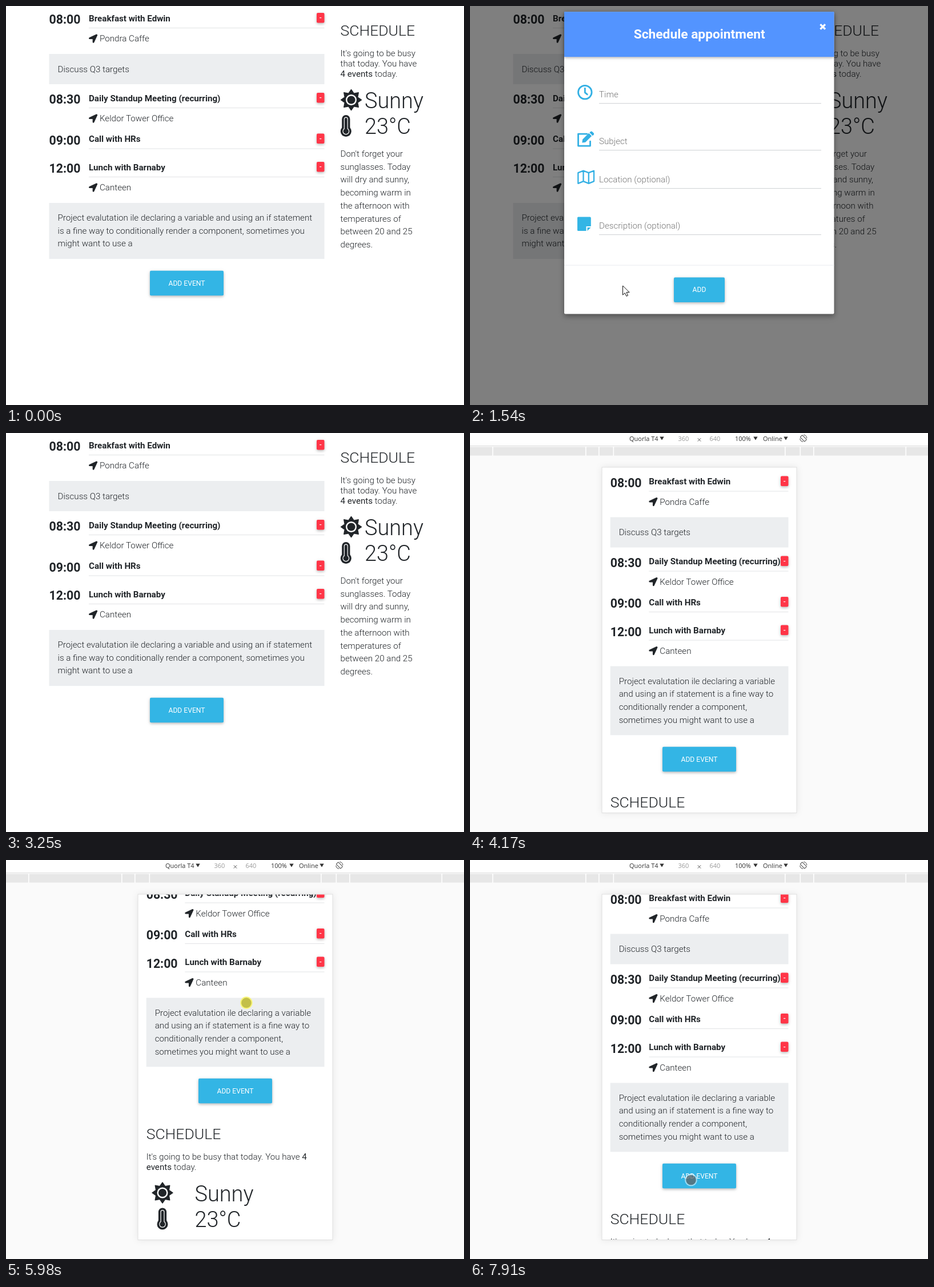
Animation of 802x699 px, one loop 8 s. Source, as an HTML page:

```html
<!DOCTYPE html>
<html lang="en">
<head>
<meta charset="utf-8">
<title>Day schedule</title>
<style>
  html, body { margin: 0; width: 100%; height: 100%; overflow: hidden; background: #fff; }
  svg { display: block; }
  text { font: 300 15.16px Roboto, sans-serif; fill: #212529; }
  .bar text { font: 400 11px "Open Sans", sans-serif; fill: #333; }
  .raised { filter: drop-shadow(0 2px 2px rgba(0,0,0,.2)) drop-shadow(0 1px 3px rgba(0,0,0,.1)); }
  .hover { filter: drop-shadow(0 4px 5px rgba(0,0,0,.25)) drop-shadow(0 3px 5px rgba(0,0,0,.14)); }
  .line { fill: none; stroke: #33b0e4; stroke-linejoin: round; stroke-linecap: round; }
</style>
</head>
<body>
<svg id="stage" width="802" height="699" viewBox="0 0 802 699"></svg>
<script>
const BLUE = '#33b5e5', DARK = '#212529';

const text = (x, y, str, { size = 15.16, weight = 300, fill = DARK, anchor = 'start' } = {}) =>
  `<text x="${x}" y="${y}" text-anchor="${anchor}" style="font-size:${size}px;font-weight:${weight};fill:${fill}">${str}</text>`;
const rect = (x, y, w, h, fill, extra = '') =>
  `<rect x="${x}" y="${y}" width="${w}" height="${h}" fill="${fill}" ${extra}/>`;
const circle = (x, y, r, fill, extra = '') =>
  `<circle cx="${x}" cy="${y}" r="${r}" fill="${fill}" ${extra}/>`;
const path = (d, fill = 'none', extra = '') => `<path d="${d}" fill="${fill}" ${extra}/>`;
const lines = (x, y, step, list) => list.map((s, i) => text(x, y + i * step, s)).join('');

const button = (x, y, w, label, id = '') =>
  rect(x, y, w, 43.5, BLUE, `rx="2" class="raised" ${id}`) +
  text(x + w / 2, y + 25.8, label, { size: 12.13, weight: 400, fill: '#fff', anchor: 'middle' });

const arrow = (x, y) => path(
  'M444 4L29 195c-48 23-32 93 19 93h176v176c0 51 70 67 93 19l192-416c16-38-26-80-65-63z',
  DARK, `transform="translate(${x} ${y}) scale(.0296)"`);

function sun(x, y) {
  const points = Array.from({ length: 16 }, (_, i) => {
    const a = i * Math.PI / 8, r = i % 2 ? 12.2 : 18;
    return `${x + r * Math.cos(a)},${y + r * Math.sin(a)}`;
  });
  return `<polygon points="${points.join(' ')}" fill="${DARK}" stroke="${DARK}" stroke-width="1.4" stroke-linejoin="round"/>` +
    circle(x, y, 9.5, '#fff') + circle(x, y, 7.1, DARK);
}

const thermometer = (x, y) => [[14.2, 9.5, DARK], [7.1, 5.9, '#fff'], [4.7, 4.75, DARK]]
  .map(([w, r, c]) => path(`M${x} ${y - 12}V${y + 9.5}`, 'none', `stroke="${c}" stroke-width="${w}" stroke-linecap="round"`) +
    circle(x, y + 9.5, r, c)).join('');

const events = [
  [0, '08:00', 'Breakfast with Edwin', 'Pondra Caffe'],
  [140, '08:30', 'Daily Standup Meeting (recurring)', 'Keldor Tower Office'],
  [211.5, '09:00', 'Call with HRs'],
  [261, '12:00', 'Lunch with Barnaby', 'Canteen']
];

function agenda(x, titleX, top, note) {
  const rows = events.map(([dy, time, title, place]) => {
    const y = top + dy;
    return text(x, y + 31.3, time, { size: 21.3, weight: 700 }) +
      text(titleX, y + 26.5, title, { weight: 700 }) +
      rect(titleX, y + 38, 557.5 - titleX, 1, '#e2e3e5') +
      rect(544, y + 12, 13.5, 17.5, '#ff3547', 'rx="2" class="raised"') +
      text(550.7, y + 25, '-', { size: 12, weight: 500, fill: '#fff', anchor: 'middle' }) +
      (place ? arrow(titleX, y + 49.5) + text(titleX + 19, y + 62.3, place) : '');
  });
  const box = (y, h) => rect(x, top + y, 557.5 - x, h, '#eceef0');
  return rows.join('') + box(84, 53) + text(x + 15, top + 115.5, 'Discuss Q3 targets') +
    box(345, 30 + 22.7 * note.length) + lines(x + 15, top + 376, 22.74, note);
}

const weather = (x, y, iconX, labelX, forecast) =>
  sun(iconX, y - 1) + text(labelX, y + 13.5, 'Sunny', { size: 37.9 }) +
  text(labelX, y + 58.5, '23°C', { size: 37.9 }) + lines(x, y + 98.5, 22.74, forecast);

const bold = s => `<tspan style="font-weight:400">${s}</tspan>`;
const heading = (x, y) => text(x, y, 'SCHEDULE', { size: 26.5 });

const desktop = agenda(75.5, 145, 0, [
  'Project evalutation ile declaring a variable and using an if statement',
  'is a fine way to conditionally render a component, sometimes you',
  'might want to use a']) +
  button(252, 463.7, 129, 'ADD EVENT', 'id="add"') +
  `<clipPath id="addClip">${rect(252, 463.7, 129, 43.5, '#000')}</clipPath>` +
  `<g clip-path="url(#addClip)">${circle(268, 487, 0, 'rgba(0,0,0,.13)', 'id="ripple"')}</g>` +
  heading(585.5, 52.3) +
  lines(585.5, 88.3, 18, ["It's going to be busy", 'that today. You have', bold('4 events') + ' today.']) +
  weather(585.5, 165.5, 604.5, 628, ["Don't forget your", 'sunglasses. Today', 'will dry and sunny,', 'becoming warm in',
    'the afternoon with', 'temperatures of', 'between 20 and 25', 'degrees.']) +
  thermometer(595.3, 210);

const field = (y, label) =>
  text(226, y, label, { fill: '#757575' }) + rect(226, y + 10, 389, 1, '#ced0d3');

const modal = rect(165, 24, 472.5, 529.5, '#fff', 'rx="2" class="hover"') +
  rect(165, 24, 472.5, 79, '#5394ff', 'class="raised"') +
  text(401.7, 71, 'Schedule appointment', { size: 22.74, weight: 700, fill: '#fff', anchor: 'middle' }) +
  path('M613.5 46l8.5 8.5m0-8.5l-8.5 8.5', 'none', 'stroke="#fff" stroke-width="3.4"') +
  field(174, 'Time') + field(256, 'Subject') + field(323, 'Location (optional)') + field(404, 'Description (optional)') +
  `<g class="line" stroke-width="2.8">` +
  circle(201.3, 165, 11.8, 'none') + path('M201.3 158v7.5l4 3.3') +
  path('M205 238H189.5V259H210.5V251') +
  path('M189.3 306l9.2-3.5 9.3 3.5 9.2-3.5v18.5l-9.2 3.7-9.3-3.7-9.2 3.7zM198.5 302.5V321M207.8 306v18.7', 'none', 'stroke-width="2.3"') +
  '</g>' +
  path('M196.3 253.5l.8-5.8 11-11 5 5-11 11zM209.3 235.6l1.8-1.8q1.4-1 2.8 0l2.8 2.8q1 1.4 0 2.8l-1.9 1.8z', '#33b0e4') +
  path('M189.5 383.5h20.5q1.8 0 1.8 1.8V400h-8.3v8h-14q-1.5 0-1.5-1.5v-21.5q0-1.5 1.5-1.5zM205.5 402h6l-6 6z', BLUE) +
  rect(165, 467.5, 472.5, 1, '#e9ecef') + button(357, 489.3, 89, 'ADD');

const drop = x => path(`M${x - 3.7} 6.5h7.4l-3.7 6z`, '#333');
const toolbar = `<g class="bar">` + rect(0, 0, 802, 699, '#fafafa') + rect(0, 0, 802, 22, '#fff') +
  rect(0, 22, 802, 1, '#dcdcdc') + rect(0, 24.5, 802, 15, '#e7e7e7') +
  [39, 202, 225, 250.5, 551, 577.5, 601, 762.5].map(x => rect(x, 24, 1.6, 16, '#fff')).join('') +
  [[279, 'Quorla T4'], [464, '100%'], [513, 'Online']].map(([x, s]) => `<text x="${x}" y="14">${s}</text>`).join('') +
  [[364.5, '360'], [419.5, '640']].map(([x, s]) => `<text x="${x}" y="14" style="fill:#999">${s}</text>`).join('') +
  path('M398.8 9.2l5.4 5.4m0-5.4l-5.4 5.4', 'none', 'stroke="#555"') +
  drop(336) + drop(500) + drop(553) +
  `<g transform="translate(583.8 9.3) rotate(-45)" fill="none" stroke="#555" stroke-width="1.1">
    <rect x="-2.6" y="-5.5" width="5.2" height="11" rx="1"/><path d="M-4.5-4A6 6 0 0 0-4.5 4M4.5-4A6 6 0 0 1 4.5 4"/></g></g>`;

const phonePage = agenda(245.7, 313.3, 63.5, [
  'Project evalutation ile declaring a variable',
  'and using an if statement is a fine way to',
  'conditionally render a component,',
  'sometimes you might want to use a']) +
  button(337, 549.7, 129, 'ADD EVENT') + heading(245.7, 655.8) +
  lines(245.7, 691.8, 18, [`It's going to be busy that today. You have ${bold('4')}`, bold('events') + ' today.']) +
  weather(245.7, 751, 274, 330.5, ["Don't forget your sunglasses. Today will", 'dry and sunny, becoming warm in the',
    'afternoon with temperatures of between', '20 and 25 degrees.']) +
  thermometer(274, 795.5);

stage.innerHTML = `
  <g id="wide">${desktop}
    ${rect(0, 0, 802, 699, '#000', 'id="shade"')}
    <g id="dialog">${modal}</g>
    <path id="cursor" d="M0 0V16.2L3.8 12.7 6.4 18.4 9 17.2 6.5 11.6H11.6Z" fill="#fff" stroke="#111" stroke-linejoin="round"/>
  </g>
  <g id="narrow">${toolbar}
    ${rect(231, 60, 341, 605.5, '#fff', 'stroke="#dfdfdf" style="filter:drop-shadow(0 0 6px rgba(0,0,0,.08))"')}
    <clipPath id="screen">${rect(231.5, 60.5, 340, 604.5, '#000')}</clipPath>
    <g clip-path="url(#screen)"><g id="page">${phonePage}</g></g>
    <g id="touch">${circle(0, 0, 10.8, '#fff', 'id="ring"')}${circle(0, 0, 8.8, '#000', 'id="dot"')}</g>
  </g>`;

const $ = id => document.getElementById(id);
const set = (id, attrs) => { for (const k in attrs) $(id).setAttribute(k, attrs[k]); };
const show = (id, on) => set(id, { display: on ? 'inline' : 'none' });
const ramp = (t, a, b) => Math.min(1, Math.max(0, (t - a) / (b - a)));
const smooth = u => u * u * (3 - 2 * u);

// Keys are [time, ...values]; returns the interpolated values.
function track(t, keys, ease = u => u) {
  const i = Math.max(1, keys.findIndex(k => k[0] > t));
  const a = keys[i - 1], b = keys[i];
  const u = ease(ramp(t, a[0], b[0]));
  return a.slice(1).map((v, j) => v + (b[j + 1] - v) * u);
}

const cursorKeys = [[0, 640, 592], [70, 630, 588], [610, 267.5, 490], [2250, 267.5, 490], [2770, 679, 529.5], [8001, 679, 529.5]];
const touchKeys = [[4500, 690, 112], [4560, 684, 120], [5330, 407.5, 414.5], [5440, 407.5, 414.5], [5800, 415, 304],
  [6200, 428, 185], [6600, 462, 345], [6850, 470, 372], [7150, 474.5, 447.5], [7550, 455, 555], [7910, 387, 560.5], [8001, 386, 561]];
const scrollKeys = [[5440, 0], [5800, 110], [6200, 235], [6450, 268], [6650, 268], [6850, 245], [7150, 170], [7600, 55], [7910, 18], [8001, 12]];

function drawDesktop(t) {
  const closing = ramp(t, 2790, 2930);
  const slide = -132 * (1 - ramp(t, 1240, 2070)) ** 5 - 60 * closing;
  const shade = t >= 3250 ? 0 : t >= 3170 ? .25 : .5 * ramp(t, 1000, 1540);
  set('shade', { opacity: shade });
  set('dialog', { opacity: ramp(t, 1240, 1540) * (1 - closing), transform: `translate(0 ${slide})` });
  set('add', { class: t > 520 && t < 2400 ? 'hover' : 'raised' });
  set('ripple', { r: 24 * Math.max(0, t - 760) / 470, opacity: 1 - ramp(t, 1300, 1700) });
  show('cursor', t >= 70 && t < 3250);
  set('cursor', { transform: `translate(${track(t, cursorKeys, smooth)})` });
}

function drawPhone(t) {
  const pressed = t > 5300 && t < 6220 || t > 6600 && t < 7600;
  set('page', { transform: `translate(0 ${-Math.round(track(t, scrollKeys)[0])})` });
  show('touch', t >= 4560);
  set('touch', { transform: `translate(${track(t, touchKeys)})` });
  set('ring', { fill: pressed ? '#f8f57c' : 'rgba(255,255,255,.5)' });
  set('dot', { fill: pressed ? '#c3bf49' : 'rgba(0,0,0,.45)' });
}

function frame(now) {
  const t = now % 8000, wide = t < 4170;
  show('wide', wide);
  show('narrow', !wide);
  (wide ? drawDesktop : drawPhone)(t);
  requestAnimationFrame(frame);
}
frame(0);
</script>
</body>
</html>
```
